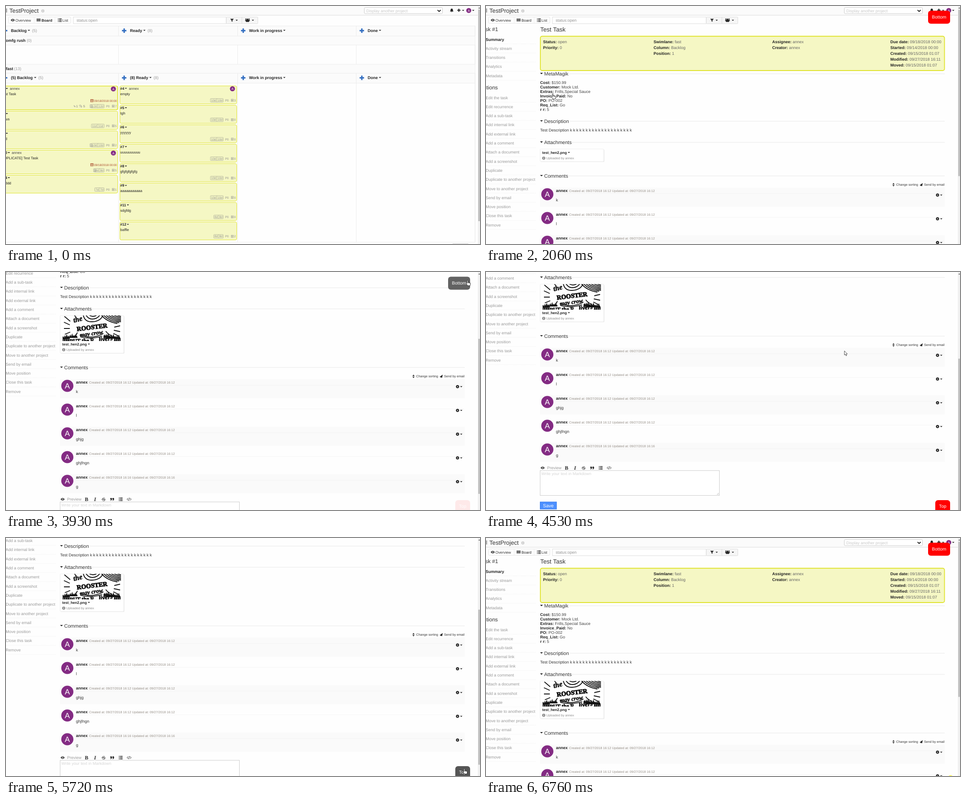
An HTML page for the animation above (6850 ms loop, 1055x531 px).

```html
<!DOCTYPE html>
<html lang="en">
<head>
<meta charset="utf-8">
<title>Task board</title>
<style>
  html, body { margin: 0; width: 100%; height: 100%; overflow: hidden; background: #fefefe; }
  svg { display: block; width: 1055px; height: 531px; font-family: "Liberation Sans", Arial, sans-serif; text-rendering: geometricPrecision; }
  tspan { font-weight: 700; fill: #222; }
  .poster text { font-family: "Liberation Serif", serif; font-weight: 700; stroke: #111; }
</style>
</head>
<body>
<svg id="stage" viewBox="0 0 1055 531"></svg>
<script>
const LOOP = 6850, USER = 'annex', PURPLE = '#832b83', YELLOW = '#f5f7c4', EDGE = '#dfe32d';
const MAX_SCROLL = 292, DOC = 823, THUMB_H = 56;

// Drawing helpers
const text = (x, y, s, size = 9, fill = '#333', bold = 0, more = '') =>
  `<text x="${x}" y="${y}" font-size="${size}" fill="${fill}"${bold ? ' font-weight="700"' : ''} ${more}>${s}</text>`;
const rect = (x, y, w, h, fill, more = '') => `<rect x="${x}" y="${y}" width="${w}" height="${h}" fill="${fill}" ${more}/>`;
const disc = (x, y, r, fill, more = '') => `<circle cx="${x}" cy="${y}" r="${r}" fill="${fill}" ${more}/>`;
const line = (d, color = '#ececec', w = 1, more = '') => `<path d="${d}" fill="none" stroke="${color}" stroke-width="${w}" ${more}/>`;
const shape = (d, fill = '#222') => `<path d="${d}" fill="${fill}"/>`;
const group = (id, body) => `<g id="${id}">${body}</g>`;
const repeat = (n, fn) => Array.from({ length: n }, (_, i) => fn(i)).join('');
const caret = (x, y, s = 2.6, fill) => shape(`M${x - s} ${y - s / 2}h${2 * s}l${-s} ${s}z`, fill);
const avatar = (x, y, r, size) => disc(x, y, r, PURPLE) + text(x, y + size * .36, 'A', size, '#fff', 0, 'text-anchor="middle"');

// Icons
const plus = (x, y, r = 5, w = 3, color = '#2f6cc0') => line(`M${x - r} ${y}h${2 * r}M${x} ${y - r}v${2 * r}`, color, w);
const info = (x, y, fill) => disc(x, y, 3.4, fill) + rect(x - .6, y - .6, 1.2, 2.6, '#fff') + rect(x - .6, y - 2.3, 1.2, 1.1, '#fff');
const eye = (x, y) => shape(`M${x - 4.5} ${y}q4.5 -6 9 0q-4.5 6 -9 0z`) + disc(x, y, 1.9, '#fff') + disc(x, y, 1.1, '#222');
const bars = (x, y) => [-3, 0, 3].map(d => rect(x - 4, y + d - .7, 1.6, 1.5, '#222') + rect(x - 1.5, y + d - .7, 6, 1.5, '#222')).join('');
const grid = (x, y) => [-3, 0, 3].map(a => [-2.2, 1.2].map(b => rect(x + a - 1.2, y + b - .6, 2.4, 2.6, '#222')).join('')).join('');
const file = (x, y) => line(`M${x - 2.3} ${y - 3.2}h3l1.8 1.8v4.8h-4.8zM${x - 1} ${y}h2.4m-2.4 1.6h2.4`, '#999', .8);
const gear = (x, y) => disc(x, y, 2.1, 'none', 'stroke="#222" stroke-width="1.9"') +
  line(`M${x - 3.8} ${y}h1.6m4.4 0h1.6M${x} ${y - 3.8}v1.6m0 4.4v1.6M${x - 2.7} ${y - 2.7}l1 1m3.4 3.4l1 1m0 -5.4l-1 1m-3.4 3.4l-1 1`, '#222', 1.5);

const header = (bold) => {
  const s = bold ? 2 : 0;
  return rect(0, 0, 1050, 20.5, '#fbfbfb') + line('M0 20.5H1050', '#dcdcdc') +
    rect(-6, 5.5, 8.5, 9, '#aaa') + text(7.5, 14.5, 'TestProject', 13.2) + info(82, 11, '#ccc') +
    rect(797.5, 3.5, 174, 13.5, '#fff', 'stroke="#ccc" rx="2"') + text(802, 13.5, 'Display another project', 9, '#c8c8c8') +
    line('M960.5 9l3.5 3.2l3.5 -3.2', '#222', 1.9) +
    shape('M988 12.2q1.6 -1.4 1.6 -4a2.5 2.5 0 0 1 5 0q0 2.6 1.6 4zM991 12.7h2.2l-1.1 1.3z') +
    plus(1008, 9.5, 3.6, 2, '#222') + caret(1017.5, 10) + avatar(1030, 10, 5.6, 7) + caret(1040, 10) +
    rect(5.5, 24.5, 136.5 + s, 14, '#fff', 'stroke="#e4e4e4" rx="2"') + line(`M62.5 25v13M${107 + s} 25v13`) +
    eye(15, 31.5) + text(21, 34.7, 'Overview', 8.3) + grid(72.5, 31) + text(79, 34.7, 'Board', 8.3, '#222', bold) +
    bars(117.5 + s, 31.5) + text(123.5 + s, 34.7, 'List', 8.3) +
    rect(148 + s, 24.5, 342 - s, 15, '#fff', 'stroke="#ddd"') + text(155 + s, 35, 'status:open', 9, '#929292') +
    rect(490.5, 24.5, 70, 15, '#f6f6f6', 'stroke="#ddd" rx="1"') + line('M525 25v14', '#ddd') +
    shape('M499 28.5h8l-3 3.5v3.5l-2 -1.5v-2z') + caret(513.5, 32) +
    disc(537.5, 29.8, 1.9, '#222') + disc(534, 29.3, 1.4, '#222') + disc(541, 29.3, 1.4, '#222') +
    shape('M532 33.5q0 -2.4 2 -2.4h7q2 0 2 2.4h-2v2h-7v-2z') + caret(549.5, 32);
};

// Board page
const G = '#8f8f8f';
const footer = (r, y, days, subs) => {
  const cell = days.length * 3.67 + 3.2, x = r - 29.5 - 2 * cell;
  return rect(x, y - 4, 2 * cell, 8, 'none', 'stroke="#b4b59a" stroke-width=".9" rx="1"') + line(`M${x + cell} ${y - 4}v8`, '#b4b59a', .9) +
    text(x + 1.7, y + 2.4, days, 6.6, G) + text(x + cell + 1.7, y + 2.4, days, 6.6, G) + text(r - 25.3, y + 2.4, 'P0', 6.6, G) +
    rect(r - 11.7, y - 2.5, 4.8, 4.8, 'none', `stroke="${G}" stroke-width=".7"`) + plus(r - 9.3, y, 1.5, .7, G) + text(r - 5.3, y + 2.4, subs, 6.6, G);
};
const card = (r, y, h, id, title, days, subs, opt = {}) => {
  const x = r - 260, cx = x + 5 + id.length * 4.45;
  return rect(x + .5, y + .5, 260, h, YELLOW, `stroke="${EDGE}" stroke-width="${opt.recent ? 1.7 : 1}" rx="3"`) +
    text(x + 1.3, y + 9, id, 8, '#222', 1) + caret(cx, y + 6.2, 2.4) +
    (opt.user ? text(cx + 6.5, y + 9, USER, 8.1, '#444') + avatar(r - 9, y + 7, 5.6, 7) : '') +
    text(opt.tx ?? x + 1.3, y + 20.8, title, 8, '#222') +
    (opt.due ? rect(r - 59.5, y + 30.5, 5.5, 5.5, 'none', 'stroke="#a8482a" stroke-width=".9"') + line(`M${r - 60} ${y + 31}h6.5m-6 2.6h5.5`, '#a8482a', 1) +
      text(r - 52, y + 35.6, '09/18/2018 00:00', 6.5, '#a8482a') : '') +
    (opt.file ? file(r - 37 - days.length * 7.34 + (days.length > 2 ? .5 : 1), y + h - 7.5) : '') +
    footer(r, y + h - 7.5, days, subs);
};
const column = (x, y, name, count, gap) => plus(x - 13, y + .5) + text(x, y + 3.2, name, 9, '#222', 1) + caret(x + gap, y) +
  (count ? text(x + gap + 7, y + 3.2, count, 9, '#999') : '');

const board = () => {
  const left = 248, right = 513;
  const ready = [['#4', 'empty', '10d', 3], ['#5', 'tgh', '10d', 0], ['#6', 'yyyyyy', '10d', 0], ['#7', 'uuuuuuuuuu', '10d', 0],
    ['#8', 'gfgfgfgfgfg', '10d', 1], ['#9', 'aaaaaaaaaaa', '10d', 0], ['#11', 'sdgfdg', '8d', 0], ['#12', 'baffle', '8d', 2]];
  return header(1) + [[44, 43], [130, 42]].map(([y, h]) => rect(0, y, 1044, h, '#fbfbfb')).join('') +
    [44.5, 67, 87, 130, 150, 172, 527].map(y => line(`M0 ${y}H1044`)).join('') +
    [250.5, 515.5, 779.5, 1044].map(x => line(`M${x} 44.5V67M${x} 87V130M${x} 150V527`)).join('') + line('M1044 44V527') +
    column(11, 54.5, 'Backlog', '(5)', 40) + column(276, 54.5, 'Ready', '(8)', 32) +
    column(11, 159.7, '(5) Backlog', '(5)', 54) + column(276, 159.7, '(8) Ready', '(8)', 45.5) +
    [54.5, 159.7].map(y => column(541, y, 'Work in progress', '', 78.5) + column(805, y, 'Done', '', 27.5)).join('') +
    text(-.5, 80, 'omfg rush', 9, '#222', 1) + text(46, 80, '(0)', 9, '#999') +
    text(0, 143, 'fast', 9, '#222', 1) + text(18, 143, '(13)', 9, '#999') +
    card(left, 178, 53, '#1', 'Test Task', '12d', 7, { user: 1, due: 1, file: 1, recent: 1 }) +
    line('M150.5 222.5l2.6 2.6q1.4 .3 1 -1l-2.6 -2.6', G, .9) + text(156, 226, '1', 7, '#777') +
    line('M163 222.8a2.2 1.6 0 1 1 2.4 1.4l-1.6 1m3.6 -2.2l1.2 .8l-.4 2.2h-1.6', G, .9) + text(172, 226, '5', 7, '#777') +
    card(left, 234, 41, '#2', 'us', '11d', 5, { tx: -.5 }) + card(left, 278, 40, '#3', 'ddd', '10d', 2, { file: 1 }) +
    card(left, 321, 53, '#10', '[DUPLICATE] Test Task', '8d', 5, { user: 1, due: 1, file: 1, tx: -12.3 }) +
    card(left, 377, 40, '#14', 'ddddd', '7d', 1) +
    ready.map((c, i) => card(right, 177.7 + i * 43.35, 40.3, ...c, { user: i === 0 })).join('');
};

// Task page
const lettering = (x, y, s, size, angle, weight, style = 'italic') =>
  text(x, y, s, size, '#111', 0, `transform="rotate(${angle} ${x} ${y})" stroke-width="${weight}" font-style="${style}"`);
const grass = (x, n, y, rise) => repeat(n, i => {
  const h = 5 + i % 3 * 2, top = y - rise * i;
  return shape(`M${x + i * 4 - 2} 378V${top}q0 ${-h / 2} 3 ${-h}q-1 ${h / 2} 3 ${h}V378z`, '#111') +
    line(`M${x + i * 4 + 1} ${top + 2}q0 4 2 6`, '#fff', .8);
});
const picture = () => '<clipPath id="crop"><rect x="126" y="319" width="130" height="57"/></clipPath><g class="poster" clip-path="url(#crop)">' +
  line('M130 321l13 11M129 334l13 6M129 348l13 0M131 361l12 -5M152 318l3 4M241 345l13 -3M240 352l14 3M239 359l12 6', '#111', 1.8) +
  line('M172 318q3 16 20 15q19 -1 24 -15M178 318q5 9 14 9q11 0 17 -9M185 318q4 3 8 3q6 0 9 -3', '#111', 1.9) +
  repeat(8, i => line(`M${212 + i * 4} ${318 - i}q12 ${15 - i} 36 ${19 - i}`, '#111', 1.9)) +
  line('M159 357q-5 10 -13 16M164 363q30 10 53 -4M166 367q24 6 48 -2M222 354q5 7 13 10', '#111', 1.8) +
  grass(127, 8, 370, .5) + grass(219, 9, 366, -.5) +
  lettering(151, 335, 'the', 16, -14, .6) +
  lettering(158, 354, 'ROOSTER', 14, -7, 1.1, 'normal') +
  lettering(165, 367, 'may crow', 13, -8, .6) +
  rect(142, 369, 24, 8, '#fff') + lettering(142, 380, 'PUT the R', 12, -2, .7, 'normal') +
  rect(211, 371, 29, 6, '#fff') + lettering(207, 378, 'livers', 14, -8, .7) + '</g>';

const section = (y, name, end) => caret(123.5, y, 3.2) + text(129.5, y + 4, name, 11) + line(`M${end} ${y + .5}H1021`, '#e8e8e8');
const facts = (x, y, step, rows, fill) => rows.map(([k, v], i) => text(x, y + i * step, `<tspan>${k}:</tspan> ${v}`, 9, fill)).join('');
const comment = (body, i) => {
  const y = 467.5 + 53 * i, at = '09/27/2018 16:' + (i < 4 ? 12 : 16);
  return (i % 2 ? '' : rect(120, y - 6, 901, 42, '#fafafa')) + line(`M156 ${y + 7}H1020`, '#ececec', 1, 'stroke-dasharray="1 1"') +
    avatar(136.5, y + 8.5, 13.5, 17) + text(155.7, y + 3, USER, 9, '#222', 1) +
    text(185, y + 3, `Created at: ${at} Updated at: ${at}`, 7.2, '#958e86') + text(155.7, y + 24.5, body, 9) +
    gear(1005, y + 10.3) + caret(1013.3, y + 10.5);
};

const task = () => {
  const menu = (y, items) => items.map((s, i) => text(-.7, y + 3 + i * 20.3, s, 9, s === 'Summary' ? '#222' : '#999', s === 'Summary') +
    line(`M0 ${y + 10 + i * 20.3}H112`, '#efefef', 1, 'stroke-dasharray="1 1"')).join('');
  const tail = text(125, 385.5, 'test_hen2.png', 8.1, '#222', 1) + caret(184.5, 383, 2.4) + info(128.5, 395.5, '#888') +
    text(134, 398, 'Uploaded by ' + USER, 7.2, '#8c8c8c') + section(434.5, 'Comments', 184) +
    shape('M904.5 454h5l-2.5 -3zM904.5 455.5h5l-2.5 3z') + text(913, 457.3, 'Change sorting', 7.2) +
    shape('M965 456l7 -5l-1.3 7l-2.3 -1l-1 1.5v-2z') + text(975, 457.3, 'Send by email', 7.2) +
    ['k', 'l', 'ghjg', 'ghjfngn', 'g'].map(comment).join('') +
    eye(126, 729) + text(136, 732, 'Preview', 9, '#999') +
    text(175.5, 733, 'B', 11.5, '#222', 1, 'font-family="Liberation Serif,serif"') +
    text(196, 733, 'I', 11.5, '#222', 1, 'font-style="italic" font-family="Liberation Serif,serif"') +
    text(214, 733, 'S', 10.5, '#222') + line('M212.5 729.3h9', '#222', .9) +
    [232, 236.7].map(x => disc(x + 1.9, 728, 1.9, '#222') + line(`M${x + 3.2} 728q.2 3 -2.7 4`, '#222', 1.2)).join('') +
    bars(255, 729) + line('M272 726.3l-2.6 2.7l2.6 2.7m4 -5.4l2.6 2.7l-2.6 2.7m-1.3 -6l-1.6 6.6', '#222', 1) +
    rect(120.5, 735, 399, 55.5, '#fff', 'stroke="#ccc"') + text(123, 745.2, 'Write your text in Markdown', 9, '#d4d4d4') +
    line('M514 789l4 -4m-1.5 4l1.5 -1.5', '#999', .7) +
    rect(120.5, 805, 36.5, 16, '#4d90fe', 'stroke="#3079ed"') + text(126.7, 816.7, 'Save', 10.5, '#fff');

  return header(0) + text(-14.5, 55.7, 'Task #1', 12) + text(-13, 186, 'Actions', 12) +
    menu(74.5, ['Summary', 'Activity stream', 'Transitions', 'Analytics', 'Metadata']) +
    menu(204.5, ['Edit the task', 'Edit recurrence', 'Add a sub-task', 'Add internal link', 'Add external link', 'Add a comment',
      'Attach a document', 'Add a screenshot', 'Duplicate', 'Duplicate to another project', 'Move to another project',
      'Send by email', 'Move position', 'Close this task', 'Remove']) +
    text(120.7, 57.2, 'Test Task', 13.6) +
    rect(121, 67.5, 899.5, 76.5, YELLOW, `stroke="${EDGE}" stroke-width="1.8" rx="4"`) +
    facts(127, 82.7, 13, [['Status', 'open'], ['Priority', 0]], '#666') +
    facts(373, 82.7, 13, [['Swimlane', 'fast'], ['Column', 'Backlog'], ['Position', 1]], '#666') +
    facts(637, 82.7, 13, [['Assignee', USER], ['Creator', USER]], '#666') +
    facts(900, 82.7, 13, [['Due date', '09/18/2018 00:00'], ['Started', '09/14/2018 00:00'], ['Created', '09/15/2018 01:07'],
      ['Modified', '09/27/2018 16:11'], ['Moved', '09/15/2018 01:07']], '#666') +
    section(150.7, 'MetaMagik', 186) +
    facts(120.5, 173.6, 10.13, [['Cost', '$150.99'], ['Customer', 'Mock Ltd.'], ['Extras', 'Frills,Special Sauce'],
      ['Invoice_Paid', 'No'], ['PO', 'PO-002'], ['Req_List', 'Go'], ['r r', 5]], '#444') +
    section(256.5, 'Description', 187) + text(120.5, 280.3, 'Test Description' + ' k'.repeat(20), 9) +
    section(303.7, 'Attachments', 191) +
    rect(121.5, 320, 142, 84, '#eaeaea', 'id="shade" rx="2"') + rect(120.5, 319, 141.5, 84, '#fff', 'id="frame" stroke="#eee" rx="2"') +
    group('picture', picture()) + group('tail', tail);
};

const button = (id, x, y, w, label) => group(id, rect(x, y, w, 29, '#f00', 'rx="6"') + text(x + w / 2, y + 17.3, label, 10.1, '#fff', 0, 'text-anchor="middle"'));

document.getElementById('stage').innerHTML = rect(0, 0, 1055, 531, '#fefefe') +
  group('board', board()) + group('task', task()) +
  rect(1050, 0, 5, 531, '#f1f1f1') + shape('M1051.5 5.5h3.5l-1.7 -2.5z', '#555') + rect(1051, 8.5, 4, 346, '#c1c1c1', 'id="thumb"') +
  button('bottom', 984, 10.5, 49, 'Bottom') + button('top', 1000, 509, 33, 'Top') +
  rect(994, 530, 35, 1, '#ccc', 'id="status"') + disc(1034, 535, 6, '#fdf75a', 'id="glow"') +
  group('arrow', '<path d="M0 0V9.2L2 7.4L3.6 11L5.2 10.2L3.7 6.9H6.6Z" fill="#fff" stroke="#222" stroke-width=".8"/>') +
  group('hand', '<path d="M3 .4q1.1 0 1.1 1.1v3.3l4.2 .9q1.6 .5 1.4 2.2l-.8 4.7H3.8L.7 8.4q-.5 -1.2 .6 -1.3l.7 .5V1.5Q2 .4 3 .4ZM4.1 4.8v2M6 5.3v1.8M8 5.7v1.7" transform="translate(-3 0)" fill="#fff" stroke="#222" stroke-width=".9"/>');

const el = Object.fromEntries([...document.querySelectorAll('svg [id]')].map(e => [e.id, e]));
const show = (e, on) => e.style.display = on ? '' : 'none';
const set = (e, name, v) => e.setAttribute(name, v);
const swing = p => .5 - Math.cos(Math.PI * Math.min(1, Math.max(0, p))) / 2;

// Pointer moves: start, end, steps, x, y
const MOVES = [[260, 510, 4, 270, 189], [810, 1050, 4, 148, 191], [1210, 1280, 2, 148.5, 195], [2520, 2750, 4, 868, 83],
  [3080, 3080, 1, 872, 80], [3160, 3610, 7, 1027, 18], [4090, 4380, 4, 1023, 85], [4470, 4700, 4, 122, 449],
  [4930, 5260, 5, 1021, 509], [5340, 5530, 3, 1020, 514], [6160, 6300, 3, 1019, 518], [6390, 6450, 2, 1026, 533]];

function pointer(t) {
  let x = 1040, y = 545;
  for (const [a, b, n, tx, ty] of MOVES) {
    if (t < a) break;
    const step = b > a ? Math.floor((t - a) / (b - a) * (n - 1) + 1e-6) + 1 : n;
    const p = Math.min(1, step / n);
    x += (tx - x) * p;
    y += (ty - y) * p;
  }
  return [x, y];
}

function draw(t) {
  const q = Math.floor((t - 10) / 80) * 80 + 10;
  const onTask = t >= 2060, loaded = t >= 2370;
  const scroll = q < 5522 ? Math.min(MAX_SCROLL, Math.round(DOC * swing((q - 3721.5) / 600)))
    : Math.round(MAX_SCROLL * (1 - swing((q - 5522) / 600)));
  const topFade = swing((q - 3857) / 400) - swing((q - 5883) / 400);

  show(el.board, !onTask);
  show(el.task, onTask);
  show(el.picture, loaded);
  set(el.task, 'transform', `translate(0 ${-scroll})`);
  set(el.tail, 'transform', `translate(0 ${loaded ? 0 : -THUMB_H})`);
  for (const e of [el.frame, el.shade]) set(e, 'height', loaded ? 84 : 84 - THUMB_H);
  set(el.thumb, 'y', onTask ? 8.5 + scroll * .633 : 8);
  set(el.thumb, 'height', !onTask ? 472 : loaded ? 346 : 371);

  const [x, y] = pointer(t);
  const overBottom = onTask && topFade < .99 && x > 984 && x < 1033 && y > 10.5 && y < 39.5;
  const overTop = onTask && topFade > .01 && x > 1000 && x < 1033 && y > 509.5;
  const hand = overBottom || overTop || (t >= 1280 && t < 2520);
  el.bottom.style.opacity = onTask ? 1 - topFade : 0;
  el.top.style.opacity = onTask ? topFade : 0;
  set(el.bottom.firstChild, 'fill', overBottom ? '#555' : '#f00');
  set(el.top.firstChild, 'fill', overTop ? '#555' : '#f00');
  show(el.arrow, !hand && t >= 260);
  show(el.hand, hand);
  for (const e of [el.arrow, el.hand]) set(e, 'transform', `translate(${x} ${y})`);
  show(el.status, t < 1280);
  show(el.glow, t >= 6760);
}

const start = performance.now();
function tick() {
  draw((performance.now() - start) % LOOP);
  requestAnimationFrame(tick);
}
tick();
</script>
</body>
</html>
```
